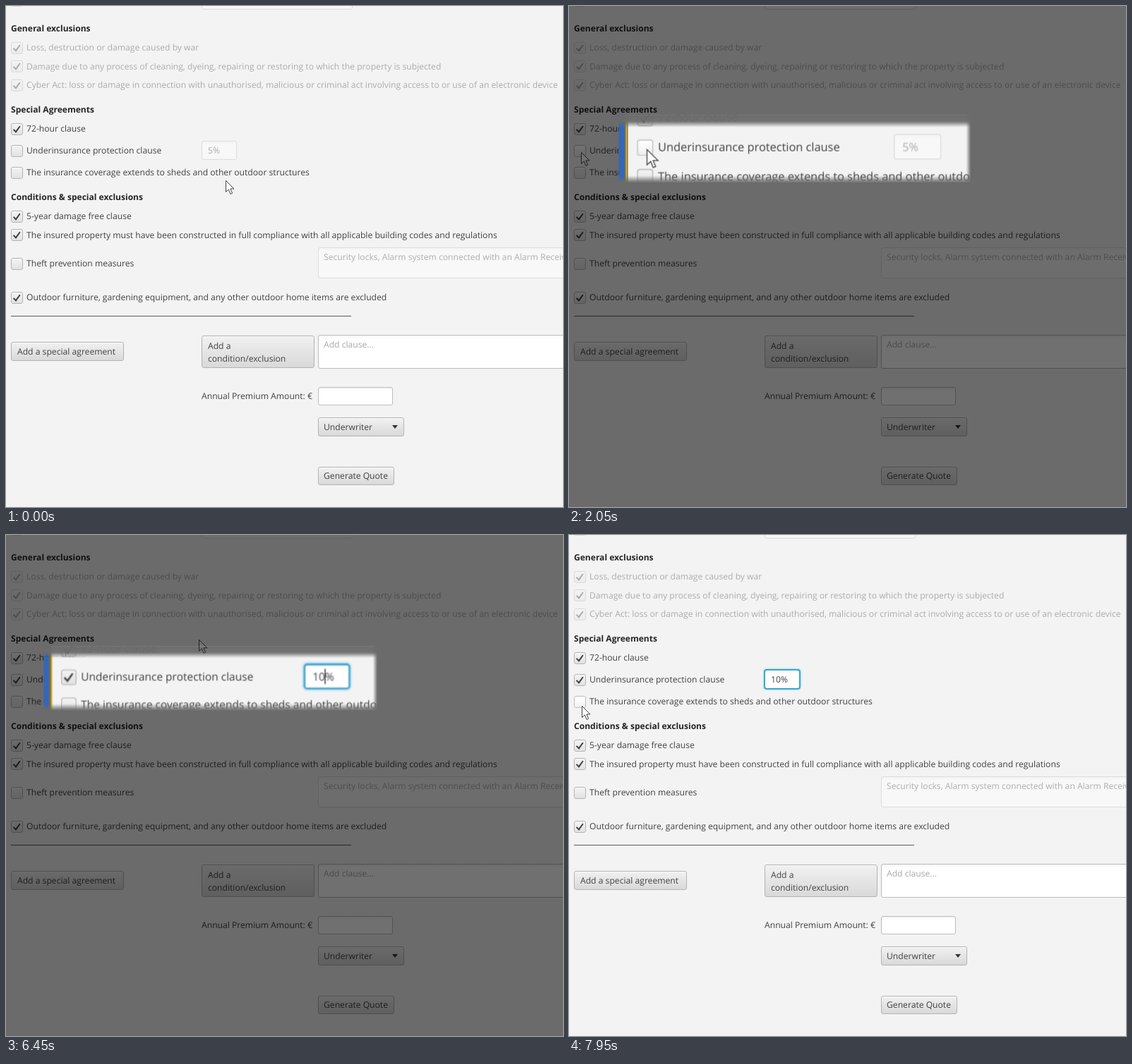
Animation of 789x710 px, one loop 8000 ms. Source, as an HTML page:

```html
<!DOCTYPE html>
<html lang="en">
<head>
<meta charset="utf-8">
<title>Insurance quote form</title>
<style>
html, body { margin: 0; width: 100%; height: 100%; overflow: hidden; background: #f3f3f3; }
#stage { position: relative; width: 789px; height: 710px; overflow: hidden; background: #f3f3f3; }
#stage *, #stage { box-sizing: border-box; }
#stage div, #stage svg { position: absolute; }
.page {
  left: 0; top: 0; width: 789px; height: 710px;
  font: 12.15px/20px "Open Sans", "Noto Sans", sans-serif;
  color: #424242; text-rendering: geometricPrecision; white-space: nowrap;
}
.head { font-weight: 700; font-size: 12.05px; color: #262626; }
.off { opacity: .4; }
.hint { color: #a8a8a8; }
.box, .button {
  border: 1px solid #b3b3b3; border-radius: 3px;
  background: linear-gradient(#f1f1f1, #d9d9d9); box-shadow: inset 0 1px #fafafa;
}
.box { background: linear-gradient(#f4f4f4, #e2e2e2); }
.field {
  border: 1px solid #bcbcbc; border-radius: 3px;
  background: linear-gradient(#f3f3f3, #fff 4px);
}
.rule { background: #5c5c5c; }
.arrow { border: 4.5px solid transparent; border-top: 5px solid #333; border-bottom: 0; }
.tick { left: 0; top: 0; fill: none; stroke: #3c3c3c; stroke-width: 1.9; }
.ring { border: 2px solid #3fa5d2; border-radius: 4px; box-shadow: 0 0 2px 1px #b5dff0; }

/* form state */
.limit, .under .tick, .under .ring, .under, .sheds, .value, .focus, .caret, .ibeam, .pointer {
  animation: 8s step-end infinite;
}
.limit { animation-name: enable; }
.under { animation-name: hoverUnder; }
.sheds { animation-name: hoverSheds; }
.under .tick { animation-name: tick; }
.under .ring { animation-name: tickRing; }
.v5 { animation-name: five; }
.v0 { animation-name: empty; }
.v1 { animation-name: one; }
.v10 { animation-name: ten; }
.focus { animation-name: focus; }
.caret { width: 1px; height: 17px; background: #222; animation-name: caretMove, blink; animation-duration: 8s, 1s; }
@keyframes enable { 0% { opacity: .4 } 26.25%, 100% { opacity: 1 } }
@keyframes hoverUnder { 0% { filter: none } 14.5% { filter: brightness(1.06) } 28%, 100% { filter: none } }
@keyframes hoverSheds { 0% { filter: none } 98%, 100% { filter: brightness(1.06) } }
@keyframes tick { 0% { opacity: 0 } 26.25%, 100% { opacity: 1 } }
@keyframes tickRing { 0% { opacity: 0 } 26.25% { opacity: 1 } 48.75%, 100% { opacity: 0 } }
@keyframes focus { 0% { opacity: 0 } 48.75%, 100% { opacity: 1 } }
@keyframes five { 0% { opacity: 1 } 55.6%, 100% { opacity: 0 } }
@keyframes empty { 0% { opacity: 0 } 55.6% { opacity: 1 } 68.1%, 100% { opacity: 0 } }
@keyframes one { 0% { opacity: 0 } 68.1% { opacity: 1 } 69.4%, 100% { opacity: 0 } }
@keyframes ten { 0% { opacity: 0 } 69.4%, 100% { opacity: 1 } }
@keyframes caretMove {
  0% { transform: translateX(7px) } 55.6% { transform: none }
  68.1% { transform: translateX(7px) } 69.4%, 100% { transform: translateX(13.5px) }
}
@keyframes blink { 0% { opacity: 0 } 23% { opacity: 1 } 75%, 100% { opacity: 0 } }

/* mouse */
.mouse { left: 0; top: 0; width: 0; height: 0; animation: mouse 8s linear infinite; }
.mouse svg { overflow: visible; }
.pointer { left: 0; top: 0; animation-name: pointer; }
.ibeam { left: -5px; top: -9px; animation-name: ibeam; }
@keyframes mouse {
  0%, 1% { transform: translate(311px, 247px) }
  7.5% { transform: translate(77px, 217.5px) }
  11.25% { transform: translate(30px, 211px) }
  16.9%, 26.6% { transform: translate(17px, 207px) }
  31% { transform: translate(140px, 150px) }
  35.6% { transform: translate(262px, 186px) }
  38% { transform: translate(283px, 199px) }
  42.5%, 57.5% { transform: translate(288px, 202px) }
  60% { transform: translate(291px, 190px) }
  67%, 83.8% { transform: translate(273px, 148px) }
  90.6% { transform: translate(234px, 175px) }
  98.5%, 100% { transform: translate(18px, 242px) }
}
@keyframes pointer { 0% { opacity: 1 } 37.5% { opacity: 0 } 60%, 100% { opacity: 1 } }
@keyframes ibeam { 0% { opacity: 0 } 37.5% { opacity: 1 } 60%, 100% { opacity: 0 } }

/* dimmed page with a magnified strip */
.spot { inset: 0; animation: spot 8s linear infinite; }
.shade { inset: 0; background: rgba(0, 0, 0, .56); }
.lens { left: 0; top: 0; width: 0; height: 0; transform-origin: 0 0; animation: zoom 8s infinite; }
.strip {
  left: -13px; top: 171px; width: 370.5px; height: 71px; overflow: hidden;
  background: linear-gradient(90deg, #3566b8 6.6px, #6a6a64 6.6px 8.5px, #d9b51c 8.5px 9.8px, #55503a 9.8px 10.3px, #f3f3f3 10.3px);
  -webkit-mask-image:
    linear-gradient(transparent, rgba(0,0,0,.06) 7px, #000 13px, #000 calc(100% - 7px), transparent),
    linear-gradient(90deg, transparent, #000 1.5px, #000 calc(100% - 5px), transparent);
  -webkit-mask-composite: source-in;
  mask-composite: intersect;
}
.strip .page { left: 13px; top: -171px; }
@keyframes spot { 0%, .4% { opacity: 0 } 4%, 90.7% { opacity: 1 } 94.3%, 100% { opacity: 0 } }
@keyframes zoom {
  0%, .5% { transform: translate(0, 0) scale(1); animation-timing-function: cubic-bezier(.37, 0, .63, 1) }
  10.4% { transform: translate(86.9px, -76.1px) scale(1.347) }
  73.75% { transform: translate(86.9px, -76.1px) scale(1.347); animation-timing-function: cubic-bezier(.333, 0, .667, .333) }
  89%, 100% { transform: translate(0, 0) scale(1) }
}
</style>
</head>
<body>
<div id="stage">
  <div class="page" id="page"></div>
  <div class="spot">
    <div class="shade"></div>
    <div class="lens"><div class="strip"></div></div>
  </div>
</div>
<script>
const page = document.getElementById('page');
const TICK = '<svg class="tick" width="17" height="17"><path d="M2.6 7.8 6 11.4 11.8 3.2"/></svg>';

function add(cls, x, y, w, h, html = '', parent = page) {
  const el = document.createElement('div');
  el.className = cls;
  el.style.cssText = `left:${x}px;top:${y}px;` + (w ? `width:${w}px;height:${h}px` : '');
  el.innerHTML = html;
  parent.append(el);
  return el;
}

// y is the middle of the line
const label = (x, y, text, cls = '') => add(cls, x, y - 10, 0, 0, text);

function check(y, text, ticked, cls = '') {
  const box = add('box ' + cls, 7, y - 8.5, 17, 17, ticked ? TICK : '');
  label(29, y, text, cls === 'off' ? cls : '');
  return box;
}

// row cut off by the top edge
add('box off', 7, -16, 17, 17);
const cut = add('field off', 277, -22, 214, 27);
add('', 140, 2, 0, 0, 'g', cut);

label(7, 32, 'General exclusions', 'head');
check(59, 'Loss, destruction or damage caused by war', true, 'off');
check(85.5, 'Damage due to any process of cleaning, dyeing, repairing or restoring to which the property is subjected', true, 'off');
check(112, 'Cyber Act: loss or damage in connection with unauthorised, malicious or criminal act involving access to or use of an electronic device', true, 'off');

label(7, 147, 'Special Agreements', 'head');
check(174, '72-hour clause', true);
const under = check(205, 'Underinsurance protection clause', true, 'under');
add('ring', -1.5, -1.5, 18, 18, '', under);
check(236, 'The insurance coverage extends to sheds and other outdoor structures', false, 'sheds');

const limit = add('limit', 277, 191, 50, 27);
add('field', 0, 0, 50, 27, '', limit);
[['v5', '5%'], ['v0', '%'], ['v1', '1%'], ['v10', '10%']]
  .forEach(([cls, text]) => add('value ' + cls, 9, 4, 0, 0, text, limit));
const focus = add('focus', 0, 0, 50, 27, '', limit);
add('ring', -1, -1, 52, 29, '', focus);
add('caret', 9, 5, 0, 0, '', focus);

label(7, 271, 'Conditions &amp; special exclusions', 'head');
check(298, '5-year damage free clause', true);
check(324.5, 'The insured property must have been constructed in full compliance with all applicable building codes and regulations', true);
check(365, 'Theft prevention measures', false);
add('field off', 442, 342, 400, 44);
label(450, 356, 'Security locks, Alarm system connected with an Alarm Receiving Centre', 'off');
check(413, 'Outdoor furniture, gardening equipment, and any other outdoor home items are excluded', true);
add('rule', 7, 439, 482, 1);

add('button', 7, 476, 160, 27);
label(16, 490, 'Add a special agreement');
add('button', 277, 467, 160, 46);
label(286, 482, 'Add a');
label(286, 500, 'condition/exclusion');
add('field', 442, 466, 400, 48);
label(450, 480, 'Add clause...', 'hint');
label(277, 553, 'Annual Premium Amount: €');
add('field', 442, 540, 106, 26);
add('button', 442, 583, 122, 27);
label(450, 597, 'Underwriter');
add('arrow', 547, 594);
add('button', 442, 653, 108, 26);
label(450, 666, 'Generate Quote');

add('mouse', 0, 0, 0, 0, `
  <svg class="pointer" width="13" height="21"><path d="M.5.5V16.5L4.3 13 7 19.4 9.6 18.3 6.9 12H12Z"
    fill="#fff" stroke="#444" stroke-width="1"/></svg>
  <svg class="ibeam" width="10" height="18"><path d="M1.5 1H4L5 2 6 1H8.5M5 2V16M1.5 17H4L5 16 6 17H8.5"
    fill="none" stroke="#444" stroke-width="1.2"/></svg>`);

const copy = page.cloneNode(true);
copy.removeAttribute('id');
document.querySelector('.strip').append(copy);
</script>
</body>
</html>
```
